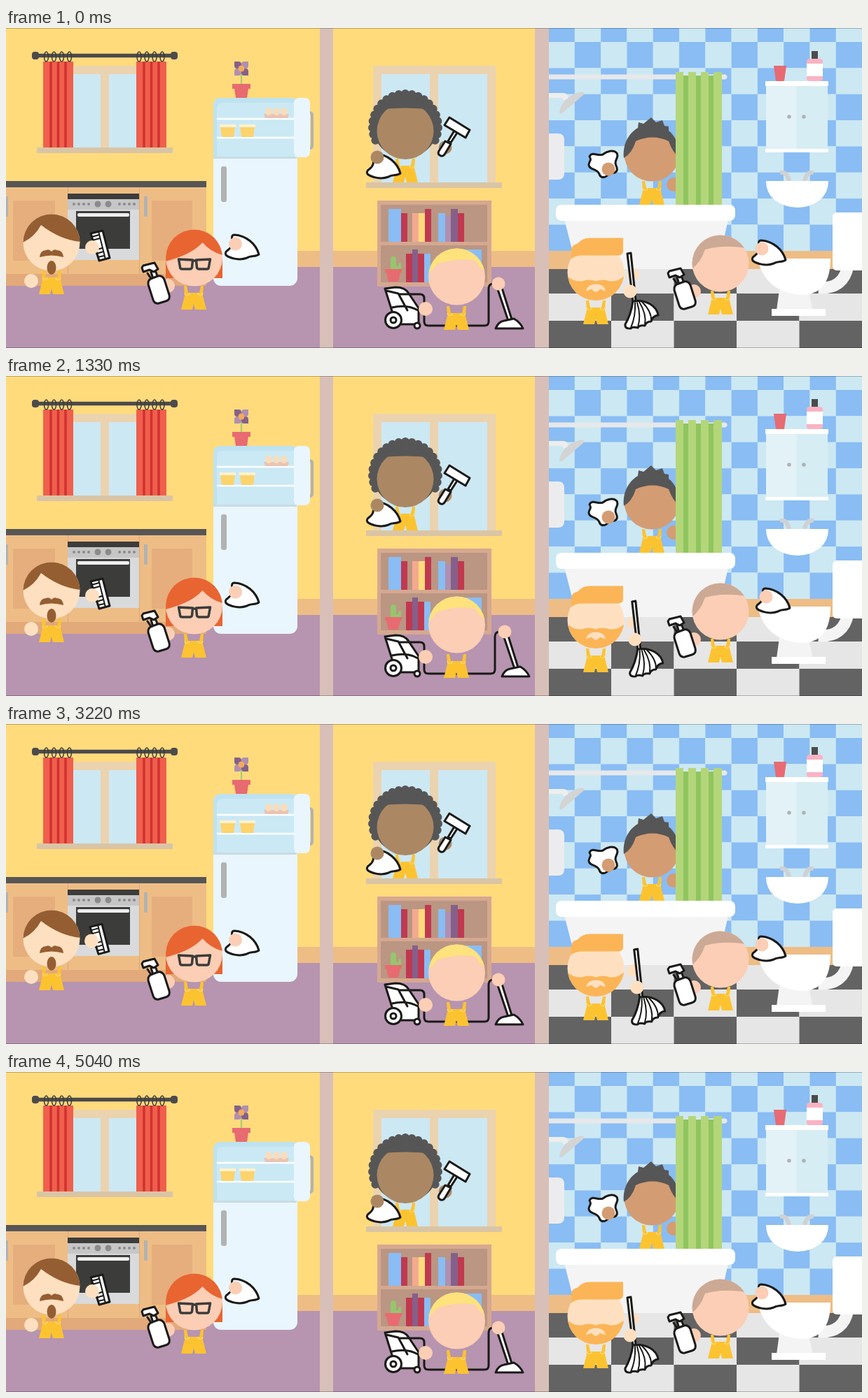
These frames come from a looping animation (1222x458 px, 5250 ms). An HTML page:

```html
<!DOCTYPE html>
<html lang="en">
<head>
<meta charset="utf-8">
<title>Cleaning team</title>
<style>
html, body { margin: 0; width: 100%; height: 100%; overflow: hidden; }
svg { display: block; width: 1222px; height: 458px; }
.ink { fill: #fff; stroke: #1a1a18; stroke-width: 3; stroke-linejoin: round; stroke-linecap: round; }
.line { fill: none; }
.thin { stroke-width: 2; }
.head { clip-path: url(#round); }
</style>
</head>
<body>
<svg viewBox="0 0 1222 458">
<defs>
  <clipPath id="round"><circle r="40.500"/></clipPath>
  <g id="overalls">
    <path fill="#fcc331" d="M-14-34h4l2 10H8l2-10h4l-1 14 5 20H2L0-8-2 0h-16l5-20z"/>
    <path d="M-13-24a3.500 3.500 0 0 0 7 0M6-24a3.500 3.500 0 0 0 7 0" fill="none" stroke="#ffe08d"/>
  </g>
  <g id="spray" class="ink">
    <path d="M207 349l6-2 4 10-7 2z"/>
    <path d="M194 343l2-3 16-4 5 9-6 4-6-3-9 3z"/>
    <path d="M202 351l4 6" class="line"/>
    <path d="M203 367q-1-7 6-9l8-3q6-1 9 5l7 22q2 7-5 9l-10 3q-6 1-8-5z"/>
  </g>
  <path id="cloth" class="ink" d="M326 296C343 297 357 309 361 324C356 328 350 325 344 329C334 333 320 330 314 325C311 318 320 319 322 311C324 304 320 296 326 296Z"/>
</defs>

<!-- rooms -->
<path fill="#ffdb7c" d="M0 0h775v320H0z"/>
<path fill="#eebd85" d="M0 319h1222v27H0z"/>
<path fill="#b794af" d="M0 342h775v116H0z"/>
<g id="tiles"></g>
<path fill="#d8c0b8" d="M448 0h19v458h-19zM755 0h20v458h-20z"/>
<path fill="none" stroke="#000" stroke-opacity=".25" d="M0 .5h1222M0 457.5h1222"/>

<!-- kitchen -->
<path fill="#ebd3af" d="M84 54h114v117H84z"/>
<path fill="#cce8f3" d="M95 66h40v105H95zM147 66h40v105h-40z"/>
<path fill="#d9c5a6" d="M44 171h194v8H44z"/>
<path fill="#f05f4c" d="M53 48h43v123H53zM186 48h43v123h-43z"/>
<path stroke="#d03230" stroke-width="3.500" d="M64 48v123M74.500 48v123M85 48v123M197 48v123M207.500 48v123M218 48v123"/>
<path stroke="#4c4b4b" stroke-width="5.500" d="M42 39.500h198"/>
<g fill="#4c4b4b"><rect x="37" y="34" width="10" height="11" rx="4"/><rect x="235" y="34" width="10" height="11" rx="4"/></g>
<g id="rings" fill="none" stroke="#3c3c3b" stroke-width="1.500"></g>

<path fill="#eebd85" d="M0 228h286v141H0z"/>
<path fill="#e2a97b" d="M0 352h286v17H0z"/>
<path fill="#e6ae7d" d="M10 247h60v86H10zM208 247h58v86h-58z"/>
<path stroke="#dca778" d="M88.500 228v124M190.500 228v124"/>
<path fill="#575656" d="M0 219h286v9H0z"/>
<path fill="#b2b2b2" d="M0 241h3v29H0zM197 241h5v29h-5z"/>
<path fill="#d9dadb" d="M88 237h102v95H88z"/>
<path fill="#3c3c3b" d="M88 237h102v8H88zM100 262h77v54h-77z"/>
<path fill="#c6c6c6" d="M88 245h102v15H88z"/>
<g fill="#8b8b8b"><circle cx="131" cy="252" r="4.500"/><circle cx="146" cy="252" r="4.500"/><g id="knobs"></g></g>
<rect x="102" y="265" width="74" height="5" rx="2" fill="#eee"/>

<rect x="296" y="100" width="120" height="269" rx="11" fill="#e9f6fe"/>
<path fill="#bfe2f0" d="M296 187v-76q0-11 11-11h105v87z"/>
<path fill="#cbe9f4" d="M301 184v-68q0-9 9-9h101v77z"/>
<path stroke="#fff" stroke-width="2.500" d="M301 130h110M301 157h110"/>
<path fill="#c8dbe3" d="M296 184h119v3H296z"/>
<path fill="none" stroke="#b2b2b2" stroke-width="4" d="M433 121q4 0 4 4v43q0 4-4 4"/>
<rect x="411" y="100" width="23" height="85" rx="7" fill="#e9f6fe"/>
<rect x="307" y="198" width="8" height="51" rx="3" fill="#b2b2b2"/>
<path fill="#e9c4b4" d="M368 123h36l-2 6h-32z"/>
<g fill="#fbdcb8"><ellipse cx="375" cy="119.500" rx="4.500" ry="5.500"/><ellipse cx="386" cy="119.500" rx="4.500" ry="5.500"/><ellipse cx="397" cy="119.500" rx="4.500" ry="5.500"/></g>
<path fill="#fdd36b" d="M306 141h21l-2 15h-17zM334 141h21l-2 15h-17z"/>
<path fill="#fff2cf" d="M305 138h23v4h-23zM333 138h23v4h-23z"/>

<path stroke="#b2cc72" stroke-width="2.500" d="M336 62v20"/>
<path fill="#e76b70" d="M323 80h26v7h-3l-2 13h-16l-2-13h-3z"/>
<path fill="#85608a" d="M336 58h-6q-4 0-4-4v-6h6q4 0 4 4zM336 58h6q4 0 4 4v6h-6q-4 0-4-4z"/>
<path fill="#b18faf" d="M336 58v-6q0-4 4-4h6v6q0 4-4 4zM336 58v6q0 4-4 4h-6v-6q0-4 4-4z"/>
<circle cx="336" cy="58" r="4.500" fill="#f3aa5c"/>

<!-- living room -->
<path fill="#ebd3af" d="M524 54h175v167H524z"/>
<path fill="#cce8f3" d="M536 66h69v155h-69zM617 66h70v155h-70z"/>
<path fill="#d9c5a6" d="M514 221h194v8H514z"/>
<path fill="#d6a890" d="M530 247h163v123H530z"/>
<path fill="#ba9683" d="M535 253h152v53H535zM535 311h152v53H535z"/>
<g id="books"></g>
<path fill="none" stroke="#97c56d" stroke-width="8" stroke-linecap="round" d="M553 331v14"/>
<path fill="none" stroke="#97c56d" stroke-width="4" stroke-linecap="round" d="M553 343h9v-5"/>
<path fill="#e76b70" d="M541 345h24v5h-2l-3 13h-14l-3-13h-2z"/>

<!-- bathroom -->
<path stroke="#e6e8ea" stroke-width="7" d="M775 70h251"/><circle cx="1026" cy="70" r="3.500" fill="#e6e8ea"/>
<path fill="#eee" d="M775 93h20q7 0 8 7l-7 4q-1-4-4-4h-17z"/>
<path fill="#d4d4d4" d="M825 92q-7-2-20 6-14 10-15 23 2 3 5 0l29-25q2-2 1-4z"/>
<path fill="#ececee" d="M775 151h13q9 0 9 9v48q0 9-9 9h-13z"/>
<path fill="#e86a73" d="M1096 54h18l-3 22h-12z"/>
<path fill="#4c4b4b" d="M1150 33h9v12h-9z"/>
<rect x="1143" y="44" width="23" height="32" rx="4" fill="#f9b3c3"/><path fill="#fff" d="M1143 51h23v18h-23z"/>
<path fill="#e2f2f6" d="M1085 82h44v92h-44z"/><path fill="#d6edf4" d="M1129 82h44v92h-44z"/>
<path fill="#fff" d="M1084 76h90v7h-90zM1084 173h90v5h-90z"/>
<g fill="#b2b2b2"><circle cx="1118" cy="127" r="2.800"/><circle cx="1139" cy="127" r="2.800"/></g>
<path fill="none" stroke="#cfd1d2" stroke-width="6" d="M1105 207q10-2 13 12M1153 207q-10-2-13 12"/>
<path fill="#fff" d="M1085 219h89q0 17-12 27-14 11-32 11t-33-11q-12-10-12-27z"/>
<path fill="none" stroke="#f4f4f4" stroke-width="17" d="M1160 372q36 2 42-32"/>
<rect x="1180" y="264" width="50" height="83" rx="6" fill="#fff"/>
<path fill="#f4f4f4" d="M1106 360h36l10 44h-52z"/>
<path fill="#fff" d="M1073 330h104q0 52-42 52-52-4-62-52zM1093 402h77v10h-77z"/>

<!-- bather -->
<use href="#overalls" x="922" y="253"/>
<g fill="#d49c72"><circle cx="922" cy="180" r="39.500"/><circle cx="953" cy="224" r="10"/></g>
<path fill="#575656" d="M882 186c-2-18 6-35 20-43l1-8 7 2 11-9 7 7 9-3 3 8 6 1v6c9 7 15 19 15 38q-9-6-15-23-23-11-47 0-5 17-17 24z"/>
<g id="washer"><path class="ink" d="M833 184C836 176 845 184 852 181C858 176 867 174 872 179C876 186 867 189 871 197C875 206 869 209 862 206C858 215 849 216 847 209C843 200 833 204 832 196C832 190 837 190 833 184Z"/><circle cx="860" cy="202" r="9.500" fill="#d49c72"/></g>
<path fill="#8fc55f" d="M956 68h66v185h-66z"/>
<path fill="#b4d67a" d="M956 63h11v190h-11zM974 63h11v190h-11zM992 63h11v190h-11zM1010 63h12v190h-12z"/>
<path fill="#f4f4f4" d="M796 270h236l-14 62q-3 13-16 13H828q-13 0-16-13z"/>
<rect x="785" y="253" width="256" height="23" rx="8" fill="#fff"/>

<!-- brush user -->
<use href="#overalls" x="65" y="381"/>
<circle cx="36" cy="362" r="10" fill="#fee0c1"/>
<g transform="translate(65 307)">
  <g class="head"><path fill="#fee0c1" d="M-41-41h82v82h-82z"/><path fill="#955e32" d="M-41 0Q-24-8-15-25 12-4 41-1V-41H-41z"/></g>
  <path fill="#955e32" d="M-17 21q1-10 9-10 5-2 8 2 3-4 8-2 8 0 9 10-17-5-34 0z"/>
  <ellipse cy="36" rx="6.500" ry="10" fill="#955e32"/>
</g>
<g id="brush"><path class="ink" d="M121 294l17-4 10 39-15 4z"/><path class="ink thin line" d="M132 291l10 40M122 299l11-3M123 304l11-3M127 318l10-3M129 323l10-3M131 328l9-2"/><circle cx="123" cy="314" r="10" fill="#fee0c1"/></g>

<!-- fridge cleaner -->
<path fill="#e86532" d="M228 329h81v29h-81z"/>
<g transform="translate(268.500 329)">
  <g class="head"><path fill="#fbceb5" d="M-41-41h82v82h-82z"/><path fill="#e86532" d="M-41 5Q-4-4 12-22 24-8 41-4V-41H-41z"/></g>
  <path fill="none" stroke="#3c3c3b" stroke-width="3.500" stroke-linejoin="round" d="M-22 2l20 1-1 11q-1 2-3 2h-11q-3 0-3-3zM23 2l-20 1 1 11q1 2 3 2h11q3 0 3-3zM-2 4h5"/>
</g>
<use href="#overalls" x="268" y="403"/>
<circle cx="231" cy="369" r="10" fill="#fbceb5"/><use href="#spray"/>
<g id="fridgeCloth"><use href="#cloth"/><circle cx="327.500" cy="309" r="9.500" fill="#fbceb5"/></g>

<!-- window cleaner -->
<g id="curls" fill="#575656"><circle cx="570" cy="139" r="47"/></g>
<use href="#overalls" x="570" y="221"/>
<g transform="translate(570 147.500)"><path class="head" fill="#ab8863" d="M-41-30Q0-36 41-30V41H-41z"/></g>
<use href="#cloth" x="202" y="-116"/>
<circle cx="530" cy="185" r="9.500" fill="#ab8863"/>
<g id="squeegee"><circle cx="627" cy="171" r="9.500" fill="#ab8863"/><path class="ink" d="M640 147l4 3-9 14-4-2z"/><path class="ink" d="M633 128l29 18-6 11-30-18zM627 162l8 4-9 15q-3 4-7 1-3-2-1-6z"/></g>

<!-- vacuum user -->
<path id="hose" class="ink line"/>
<g class="ink"><path d="M541 373l15-2q14 0 19 9l14 21v23h-41l3-19z"/><path class="line" d="M543 376l17 4 13 24M551 400q22-5 37 4M575 381l-14 0"/><circle cx="553" cy="418" r="11.500"/><circle cx="553" cy="418" r="4"/><circle cx="587" cy="426" r="4"/></g>
<use href="#overalls" x="643" y="432"/>
<circle cx="599" cy="402" r="10" fill="#fbceb5"/>
<g transform="translate(643.500 356)" class="head"><path fill="#fbceb5" d="M-41-41h82v82h-82z"/><path fill="#fee27c" d="M-41-5Q-33-10-29-18 0-28 27-23 32-12 41-8V-41H-41z"/></g>
<g id="wand"><path class="ink" d="M701 371l6-2 15 48-5 2z"/><path class="ink" d="M699 430q4-10 12-11l14-3q9 5 13 14z"/><circle cx="703" cy="366" r="9.500" fill="#fbceb5"/></g>

<!-- mop user -->
<use href="#overalls" x="842" y="424"/>
<circle cx="895" cy="353" r="9" fill="#fee0c1"/>
<g transform="translate(842 349.500)">
  <g class="head"><path fill="#fee0c1" d="M-41-41h82v82h-82z"/><path fill="#fbb557" d="M-41 5Q-32 14-20 13-10 9 0 13 10 9 20 13 32 14 41 5V41H-41z"/></g>
  <path fill="#fbb557" d="M-35-19v-14q1-6 9-8 7-8 17-8h48v20q-1 5-8 5h-50q-10 0-16 5z"/>
  <path fill="#fee0c1" d="M-14 27q2-10 14-10t14 10q-6-2-8-3-6 8-12 0-2 1-8 3z"/>
</g>
<g id="mop"><path class="ink" d="M887 323l5-1 7 69-4 1z"/><path class="ink" d="M895 391C914 388 929 398 931 411Q923 412 921 420 914 420 912 426 904 425 902 429 894 427 892 430 883 431 884 424 892 411 895 391Z"/><path class="ink thin line" d="M898 393q1 20-6 36M901 393q6 20 1 35M904 392q11 18 8 33M908 392q14 14 13 27"/><circle cx="891" cy="377" r="9.500" fill="#fee0c1"/></g>

<!-- toilet cleaner -->
<use href="#overalls" x="1020" y="410"/>
<circle cx="982" cy="377" r="10" fill="#fbceb5"/>
<g transform="translate(1020 337)" class="head"><path fill="#fbceb5" d="M-41-41h82v82h-82z"/><path fill="#cca994" d="M-41 8Q-28-2-22-20 6-28 41-21V-41H-41z"/></g>
<use href="#spray" x="751" y="8"/>
<g id="toiletCloth"><use href="#cloth" x="752" y="8"/><circle cx="1079" cy="316" r="9.500" fill="#fbceb5"/></g>
</svg>
<script>
const $ = id => document.getElementById(id);
const add = (parent, tag, attrs) => {
  const el = document.createElementNS('http://www.w3.org/2000/svg', tag);
  for (const k in attrs) el.setAttribute(k, attrs[k]);
  $(parent).append(el);
};
const rect = (parent, x, y, width, height, fill) => add(parent, 'rect', { x, y, width, height, fill });

// Wall and floor tiles
for (let r = 0; r < 9; r++) for (let c = 0; c < 12; c++) {
  const y = r ? 20 + (r - 1) * 37.35 : 0;
  rect('tiles', 774.5 + c * 37.3, y, 37.5, r ? 37.5 : 20, (r + c) % 2 ? '#cce8f3' : '#89bdf3');
}
for (let r = 0; r < 3; r++) for (let c = 0; c < 5; c++)
  rect('tiles', 774.5 + c * 89.5, [345, 380, 419][r], 89.5, 39, (r + c) % 2 ? '#e6e6e6' : '#636363');

for (const x of [57.5, 190]) for (let i = 0; i < 4; i++)
  add('rings', 'ellipse', { cx: x + i * 11, cy: 41, rx: 3, ry: 7 });
for (const x of [97, 162]) for (let i = 0; i < 4; i++)
  add('knobs', 'circle', { cx: x + i * 7, cy: 252, r: 2 });

const [blue, red, peach, yellow, mauve, plum] = ['#89bdf3', '#c0394f', '#f5a98e', '#ffdb7c', '#b18faf', '#85608a'];
const shelf = (bottom, books) => books.forEach(([x, w, h, fill]) => rect('books', x, bottom - h, w, h, fill));
shelf(306, [[546, 18, 47, blue], [564, 9, 41, red], [580, 9, 41, peach], [589, 9, 41, yellow], [598, 9, 47, red],
  [617, 10, 41, blue], [627, 8, 37, mauve], [635, 10, 47, plum], [645, 9, 41, red]]);
shelf(364, [[571, 9, 41, red], [580, 8, 47, plum], [588, 9, 41, red], [597, 9, 41, blue], [654, 25, 47, blue]]);

for (let a = -205; a <= 25; a += 11.5)
  add('curls', 'circle', { cx: 570 + 47 * Math.cos(a * Math.PI / 180), cy: 141 + 47 * Math.sin(a * Math.PI / 180), r: 6 });

// Progress in cycles of the active run, or 0 at rest; each run is [start, cycles]
const phase = (t, period, ...runs) => {
  const run = runs.find(([start, cycles]) => t >= start && t < start + cycles * period);
  return run ? (t - run[0]) / period % 1 : 0;
};
const swing = (...args) => 1 - Math.abs(2 * phase(...args) - 1);
const move = (id, x, y = 0) => $(id).setAttribute('transform', `translate(${x} ${y})`);

function draw(now) {
  const t = Math.min(5040, Math.floor(now % 5250 / 70) * 70);

  const scrub = swing(t, 350, [420, 2], [1330, 1], [1890, 6]);
  move('brush', -2.5 * scrub, -9 * scrub);

  const wipe = swing(t, 840, [0, 1], [1680, 1], [4200, 1]);
  move('fridgeCloth', 4.5 * wipe, -20.5 * wipe);

  const squeeze = swing(t, 350, [1890, 3], [3380, 3]);
  move('squeegee', 15.5 * squeeze, -29 * squeeze);

  const push = 9 * swing(t, 840, [910, 2], [3780, 1]);
  move('wand', push);
  $('hose').setAttribute('d', `M577 381H591Q597 381 597 387V420Q597 426 603 426H${683 + push}q6 0 6-6V373q0-7 7-7h7`);

  const angle = 2 * Math.PI * phase(t, 1120, [0, 1], [1750, 1]) - Math.PI / 4;
  move('washer', -7 + 9.9 * Math.cos(angle), -7 - 9.9 * Math.sin(angle));

  move('mop', 15 * swing(t, 1085, [0, 2], [2870, 2]));
  move('toiletCloth', 30 * swing(t, 700, [0, 2]));
  requestAnimationFrame(draw);
}
requestAnimationFrame(draw);
</script>
</body>
</html>
```
